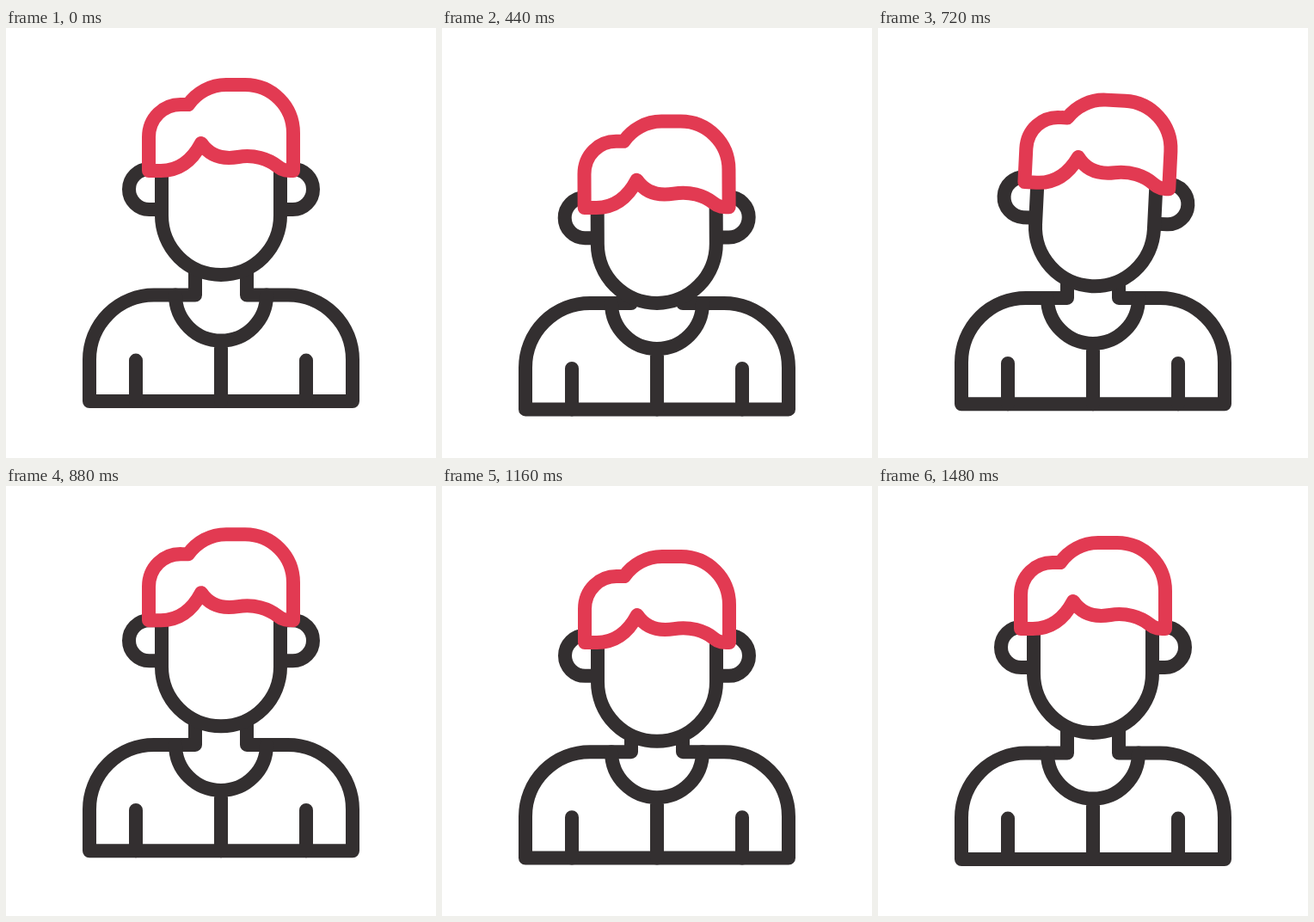
Animation of 500 by 500 pixels, one loop 2 s. Source, as an HTML page:

```html
<!DOCTYPE html>
<html lang="en">
<head>
<meta charset="utf-8">
<title>Nodding man</title>
<style>
  html, body { margin: 0; width: 100%; height: 100%; overflow: hidden; background: #fff; }
  svg { display: block; width: 100vw; height: 100vh; }
  path { fill: none; stroke: #332f30; stroke-width: 16; stroke-linecap: round; stroke-linejoin: round; }
  .solid { fill: #fff; }
  .hair { stroke: #e23a52; }
</style>
</head>
<body>
<svg viewBox="0 0 500 500">
  <g id="body">
    <path d="M220 280V310.600H172A75 75 0 0 0 97 385.600V434H403V385.600A75 75 0 0 0 328 310.600H280V280"/>
    <path d="M197 310.600A53 53 0 0 0 303 310.600M250 363.600V434M151 386.600V434M349 386.600V434"/>
  </g>
  <g id="head">
    <path d="M181 211H166.500A23.500 23.500 0 0 1 166.500 164H181M319 211H333.500A23.500 23.500 0 0 0 333.500 164H319"/>
    <path class="solid" d="M181 166V218A69 69 0 0 0 319 218V166"/>
    <path id="hair" class="solid hair" d="M166 166V127C166 105 183 88 205 89H212C222 75 238 66 256 66H278C309 66 334 91 334 122V166C327 166 322 166 316 161C305 152 288 147 270 150C252 153 237 149 227 134C216 155 201 166 180 166Z"/>
  </g>
</svg>
<script>
  const LOOP = 2000, STEP = 40;
  const [body, head, hair] = ['body', 'head', 'hair'].map(id => document.getElementById(id));

  // Eased progress from 0 to 1 between two times
  function ease(t, from, to) {
    const p = Math.min(1, Math.max(0, (t - from) / (to - from)));
    return p * p * (3 - 2 * p);
  }

  // Drop, rebound, dip and settle; lag delays the rebound and the dip
  function bounce(t, drop, rise, dip, lag = 0) {
    const top = 835 + lag, low = 1200 + lag;
    return drop * ease(t, 195, 570)
      + (rise - drop) * ease(t, 570, top)
      + (dip - rise) * ease(t, top, low)
      - dip * ease(t, low, 1480);
  }

  function tilt(t) {
    const left = -5.8, right = 4.5;
    return left * ease(t, 0, 240)
      + (right - left) * ease(t, 240, 620)
      - right * ease(t, 620, 860);
  }

  function draw(now) {
    const t = Math.floor((now % LOOP) / STEP) * STEP;
    const y = bounce(t, 45.5, -8.5, 10.5);
    const hairY = bounce(t, 59, -11, 17) - y;
    body.setAttribute('transform', `translate(0 ${bounce(t, 13, -10, 1, 70)})`);
    head.setAttribute('transform', `translate(0 ${y}) rotate(${tilt(t)} 250 258)`);
    hair.setAttribute('transform', `translate(0 ${hairY})`);
  }

  const start = performance.now();
  (function tick() {
    draw(performance.now() - start);
    requestAnimationFrame(tick);
  })();
</script>
</body>
</html>
```
